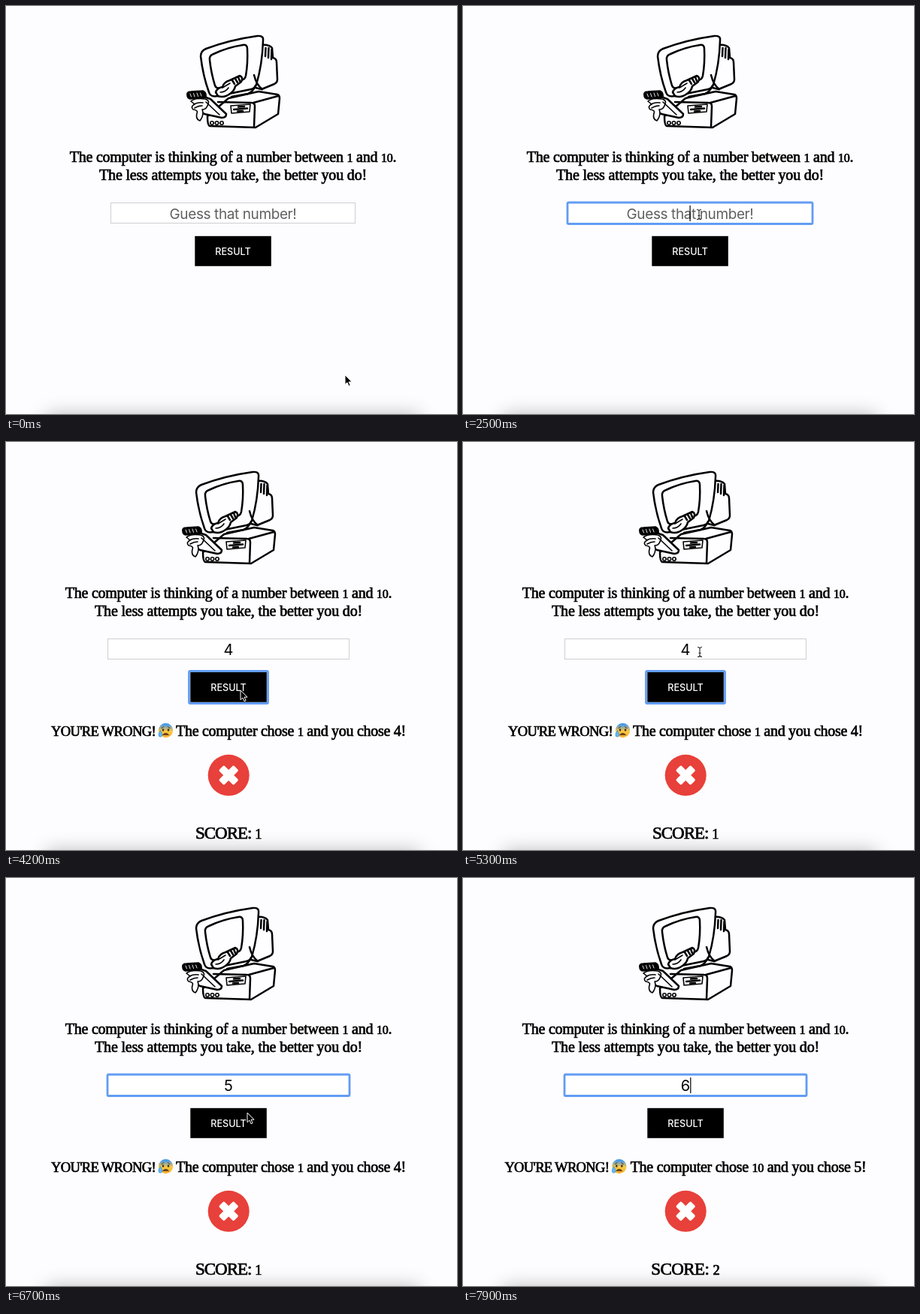
These frames come from a looping animation (600x544 px, 8000 ms). An HTML page:

```html
<!DOCTYPE html>
<html lang="en">
<head>
<meta charset="utf-8">
<title>Number guessing game</title>
<style>
  html, body { margin: 0; width: 100%; height: 100%; overflow: hidden; background: #fdfcfe; }
  #stage { position: relative; width: 600px; height: 544px; overflow: hidden; }
  #stage svg { position: absolute; inset: 0; }
  #shade { position: absolute; left: 54px; top: 546px; width: 496px; height: 30px; box-shadow: 0 0 26px rgba(0, 0, 0, .3); }
  text { text-anchor: middle; }
  .slab { font: 20px "Liberation Serif", "Times New Roman", serif; stroke: #000; stroke-width: .7; }
  .small { font-size: .8em; }
  .ui { font-family: Inter, "Liberation Sans", sans-serif; }
  .ink { fill: #fefdff; stroke: #000; stroke-width: 2.5; stroke-linejoin: round; stroke-linecap: round; }
  .thin { stroke-width: 1.6; }
  .line { fill: none; }
  .solid { fill: #000; }
  .ring { fill: none; stroke: #629cf3; stroke-width: 2.8; }
</style>
</head>
<body>
<div id="stage">
  <svg width="600" height="544" viewBox="0 0 600 544">
    <defs>
      <linearGradient id="skin" x2="0" y2="1">
        <stop offset=".12" stop-color="#4a9be8"/>
        <stop offset=".55" stop-color="#fbc943"/>
        <stop offset="1" stop-color="#f5ae2e"/>
      </linearGradient>
    </defs>

    <g id="page">
      <g class="ink">
        <!-- system unit -->
        <path d="M268 147L296 123L336 114L361 118Q364 119 364 123L362 144L332 162L271 160Q268 159 268 147Z"/>
        <path class="line" d="M282 128L327 129Q331 129 331 134L330 161M329 129L362 120"/>
        <path class="thin" d="M299 133L325 131L324 141L300 143Z"/>
        <path class="line" d="M303 138L321 136.500M309 134.500L317 134M308 140.500L315 140"/>
        <g class="thin">
          <circle cx="274" cy="156" r="2.2"/><circle cx="280.500" cy="156" r="2.2"/><circle cx="287" cy="156" r="2.2"/>
        </g>
        <!-- monitor -->
        <path d="M340 52Q350 51 354 56L355 69Q360 70 360 75L361 98Q361 102 357 104L340 111L328 108Z"/>
        <path d="M345.500 56L345 67M349.500 56L349 69M353.500 58L353 71"/>
        <path d="M259 67Q259 60 266 57Q298 45 334 40Q343 39 342 46Q341 78 333 105Q331 110 326 111L282 120Q272 122 270 115Q262 93 259 67Z"/>
        <path d="M271 72Q270 66 276 64Q295 55 315 52Q321 51 321 57Q322 76 319 93Q318 98 313 99L286 109Q280 111 278 106Q273 90 271 72Z"/>
        <path class="line" d="M330 92Q333 105 341 111M332 106Q328 115 322 117L300 121"/>
        <!-- right hand -->
        <path d="M279 115Q281 109 288 108Q290 101 298 99L311 93Q316 95 313 101L305 107Q304 113 298 117Q290 123 282 120Z"/>
        <path d="M301 99L304 104M305 97L308 102M309 95L311 100"/>
        <path class="thin line" d="M285 115Q292 115 296 109M288 109L298 103"/>
        <!-- left arm and hand -->
        <path d="M263 121L272 124L293 144Q293 149 287 149L264 144L254 138Z"/>
        <path class="thin" d="M246 127Q252 122 265 124Q272 126 268 133Q266 138 261 138Q264 145 258 153Q252 151 254 143Q256 139 249 138Q245 134 251 131Z"/>
        <path class="thin line" d="M250 131Q256 128 262 129M251 136Q256 133 261 133M266 128L284 145"/>
        <path class="solid thin" d="M241 119Q240 114 246 114L262 113Q267 115 266 122L245 124Q241 123 241 119Z"/>
        <path d="M245 117L246.500 121M249.500 116.500L251 121M254 116L255.500 120.500M258.500 116L260 120" stroke="#fff" stroke-width=".9"/>
      </g>

      <text class="slab" x="302" y="208" letter-spacing="-.25">The computer is thinking of a number between 1 and 10.</text>
      <text class="slab" x="302" y="232" letter-spacing="-.17">The less attempts you take, the better you do!</text>

      <rect id="field" y="262.500" height="27" fill="#fff" stroke="#cfced2"/>
      <rect id="fieldRing" class="ring" y="262" height="28.500" rx="1.500"/>
      <text id="hint" class="ui" x="302" y="283.500" font-size="19" letter-spacing="-.4" fill="#606062">Guess that number!</text>
      <text id="value" class="ui" x="302" y="284" font-size="20"></text>
      <rect id="caret" y="266" width="1.200" height="21"/>

      <rect x="251.300" y="306.800" width="101.500" height="40"/>
      <rect id="buttonRing" class="ring" x="249.500" y="305.500" width="105" height="43" rx="1.500"/>
      <text class="ui" x="302" y="332" font-size="12.600" font-weight="500" fill="#fff">RESULT</text>
    </g>

    <g id="result">
      <g id="lead">
        <text class="slab" x="129.500" y="392" style="font-size:18.5px" letter-spacing="-.66">YOU'RE WRONG!</text>
        <g transform="translate(212.500 384.500)">
          <circle r="9.700" fill="url(#skin)"/>
          <path d="M-6-3Q-4-3-2.500-5.500M6-3Q4-3 2.500-5.500M-4 6Q0 1.500 4 6Z" fill="#6b431d" stroke="#6b431d"/>
          <ellipse cx="-3.500" cy="-.5" rx="1.300" ry="1.700" fill="#4c321c"/>
          <ellipse cx="3.500" cy="-.5" rx="1.300" ry="1.700" fill="#4c321c"/>
          <path d="M-7 0Q-11 5-9 8Q-6.500 10-4.700 7Q-4.500 4-7 0Z" fill="#62b8f5" stroke="#2f86d0" stroke-width=".6"/>
        </g>
      </g>
      <text id="tail" class="slab" y="392" letter-spacing="-.28"></text>
      <circle cx="296.200" cy="444.300" r="27.500" fill="#e8403a"/>
      <g transform="translate(296.200 444.300)" fill="#fff">
        <rect x="-14" y="-5" width="28" height="10" rx="2" transform="rotate(45)"/>
        <rect x="-14" y="-5" width="28" height="10" rx="2" transform="rotate(-45)"/>
      </g>
      <text id="score" class="slab" x="295.700" y="528.500" style="font-size:23px"></text>
    </g>
  </svg>
  <div id="shade"></div>
  <svg width="600" height="544" viewBox="0 0 600 544">
    <path id="arrow" d="M0 0V12.700L2.900 10L5 14.700L7.100 13.800L5.100 9.200H9Z" stroke="#fff"/>
    <path id="beam" d="M-3-6.500Q0-6.500 0-4.500Q0-6.500 3-6.500M0-4.500V4.500M-3 6.500Q0 6.500 0 4.500Q0 6.500 3 6.500M-1.500 1.500H1.500" fill="none" stroke="#222" stroke-width="1.100"/>
  </svg>
</div>
<script>
const LOOP = 8000, STEP = 100;
const $ = id => document.getElementById(id);

// Each track holds [time, value] pairs; a value lasts until the next time.
const tracks = {
  focus: [[0, ''], [2500, 'field'], [4000, 'button'], [5500, 'field'], [6800, 'button'], [7400, 'field']],
  value: [[0, ''], [3300, '4'], [5800, ''], [6000, '5'], [7700, ''], [7800, '6']],
  caret: [[0, 0], [2500, 1], [2900, 0], [3300, 1], [4000, 0], [5500, 1], [6400, 0], [7400, 1]],
  round: [[0, 0], [4200, 1], [6800, 2]],
  pointer: [[0, 1], [3000, 0], [3300, 1], [5800, 0], [6400, 1], [7700, 0]]
};

const rounds = [
  null,
  { tail: 'The computer chose 1 and you chose 4!', x: 379, lead: 0, spacing: -1 },
  { tail: 'The computer chose 10 and you chose 5!', x: 379.5, lead: -4.7, spacing: -.6 }
];

// Pointer stops: time, x, y
const path = [
  [0, 451, 492], [800, 451, 492], [1300, 352, 272], [1800, 352, 272], [1900, 321, 272],
  [2300, 314, 274], [2400, 314, 278], [3300, 314, 278], [3600, 314, 326], [4100, 312, 331],
  [5000, 312, 331], [5300, 315, 280], [6400, 318, 282], [6700, 321, 313], [6800, 319, 319],
  [7000, 319, 319], [7300, 315, 280], [LOOP, 315, 280]
];

const pick = (track, t) => track.filter(([at]) => at <= t).pop()[1];

function pointerAt(t) {
  const i = path.findIndex(([at]) => at > t);
  const [t0, x0, y0] = path[i - 1], [t1, x1, y1] = path[i];
  const p = (t - t0) / (t1 - t0), k = p * p * (3 - 2 * p);
  return [x0 + (x1 - x0) * k, y0 + (y1 - y0) * k];
}

function set(id, attrs) {
  for (const name in attrs) $(id).setAttribute(name, attrs[name]);
}
const show = (id, on) => { $(id).style.visibility = on ? 'visible' : 'hidden'; };

// Old-style figures: 0, 1 and 2 are as low as the small letters.
function setSlab(el, text) {
  el.innerHTML = text.replace(/[012]+/g, '<tspan class="small">$&</tspan>');
}

function drawPage(s) {
  const width = s.round ? 321 : 325, left = 302 - width / 2;
  set('page', { transform: `translate(${s.round ? -6 : 0} 0)` });
  set('field', { x: left, width });
  set('fieldRing', { x: left - .5, width: width + 1 });
  show('fieldRing', s.focus === 'field');
  show('buttonRing', s.focus === 'button');
  show('hint', !s.value);
  $('value').textContent = s.value;
  set('caret', { x: s.value ? 308.2 : 301.5 });
  show('caret', s.caret);
}

function drawResult(round) {
  const r = rounds[round];
  show('result', r);
  if (!r) return;
  set('lead', { transform: `translate(${r.lead} 0)` });
  set('tail', { x: r.x });
  setSlab($('tail'), r.tail);
  set('score', { 'letter-spacing': r.spacing });
  setSlab($('score'), 'SCORE: ' + round);
}

function drawPointer(t, visible) {
  const [x, y] = pointerAt(t);
  const overField = t > 2300 && y < 290;
  show('arrow', visible && !overField);
  show('beam', visible && overField);
  set('arrow', { transform: `translate(${x} ${y})` });
  set('beam', { transform: `translate(${x} ${y})` });
}

function draw(t) {
  const s = {};
  for (const name in tracks) s[name] = pick(tracks[name], t);
  drawPage(s);
  drawResult(s.round);
  drawPointer(t, s.pointer);
}

document.querySelectorAll('#page .slab').forEach(el => setSlab(el, el.textContent));

const start = performance.now();
function tick() {
  const t = (performance.now() - start) % LOOP;
  draw(Math.floor(t / STEP) * STEP);
  requestAnimationFrame(tick);
}
tick();
</script>
</body>
</html>
```
